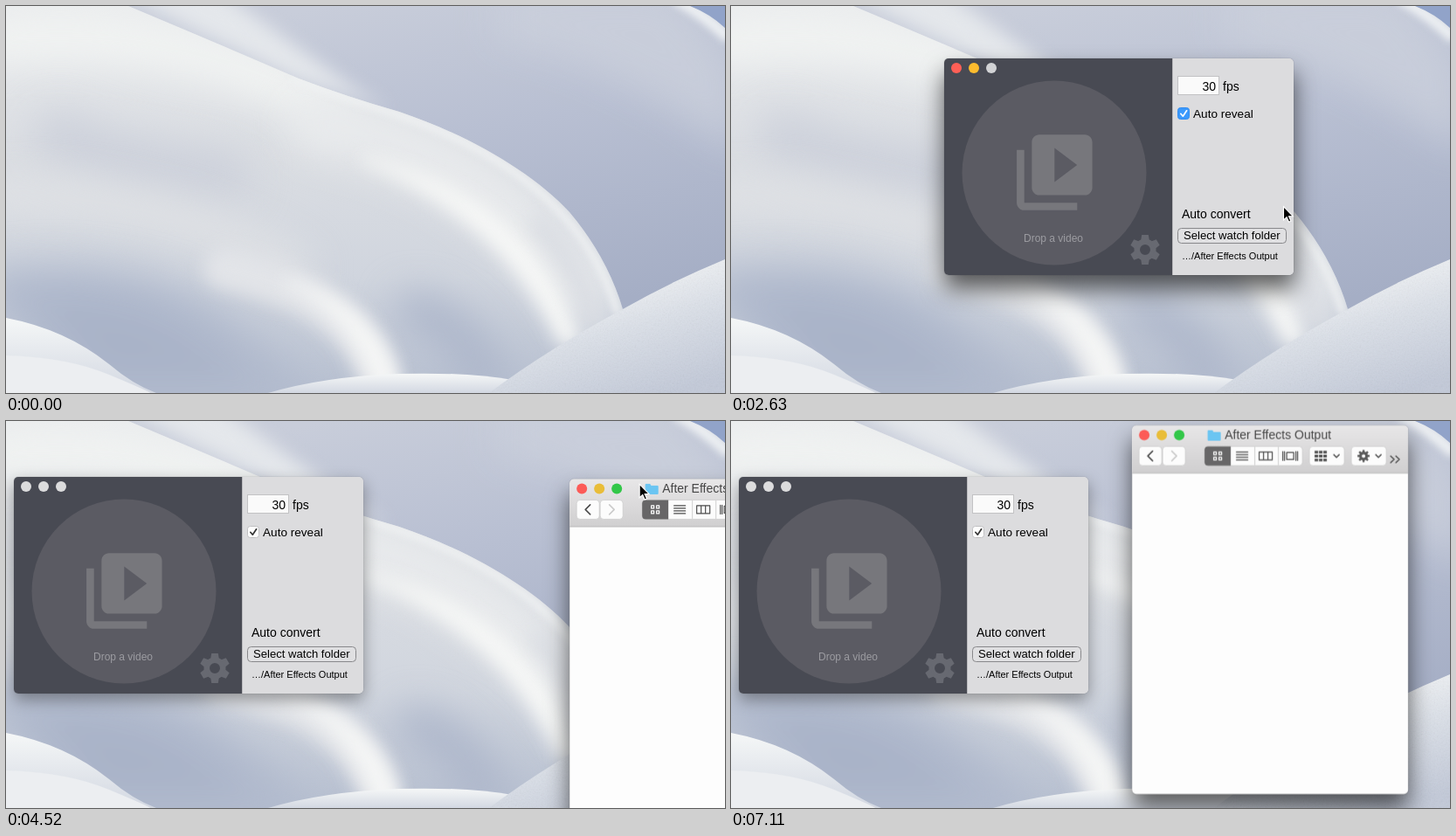
Animation of 823x443 px, one loop 8000 ms. Source, as an HTML page:

```html
<!DOCTYPE html>
<html lang="en">
<head>
<meta charset="utf-8">
<title>Watch folder demo</title>
<style>
html, body { margin: 0; width: 100%; height: 100%; overflow: hidden; }
#stage { position: relative; width: 823px; height: 443px; overflow: hidden; }
#stage > * { position: absolute; left: 0; top: 0; }
svg { display: block; font-family: "Liberation Sans", Arial, sans-serif; }
.window { overflow: hidden; border-radius: 5px; will-change: transform; }
.window svg { position: absolute; left: 0; top: 0; }
#app { width: 400px; height: 248px; transform-origin: 130px 124px; }
#finder { width: 316px; height: 422px; background: #fdfdfd; }
.active { box-shadow: 0 0 1px rgba(0,0,0,.5), 0 16px 27px rgba(0,0,0,.62); }
.inactive { box-shadow: 0 0 1px rgba(0,0,0,.45), 0 7px 18px rgba(0,0,0,.36); }
.soft { filter: blur(4px); }
.softer { filter: blur(10px); }
.softest { filter: blur(22px); }
.line { fill: none; stroke-linecap: round; stroke-linejoin: round; }
</style>
</head>
<body>
<div id="stage">
  <svg id="snow" width="823" height="443">
    <defs>
      <linearGradient id="sky" x1=".45" y1="0" x2=".8" y2="1">
        <stop offset="0" stop-color="#c8cdda"/><stop offset=".35" stop-color="#b8bfd2"/><stop offset=".8" stop-color="#a5aec5"/>
      </linearGradient>
      <linearGradient id="dune" x1=".3" y1="0" x2=".3" y2="1">
        <stop offset="0" stop-color="#e9ebed"/><stop offset=".4" stop-color="#dadde2"/><stop offset=".7" stop-color="#d0d5de"/><stop offset="1" stop-color="#b6bfd0"/>
      </linearGradient>
      <linearGradient id="mound" x1=".35" y1=".25" x2=".75" y2="1">
        <stop offset="0" stop-color="#f2f4f6"/><stop offset=".4" stop-color="#dce1e9"/><stop offset="1" stop-color="#c3cad9"/>
      </linearGradient>
      <linearGradient id="low" x1="0" y1="0" x2="0" y2="1">
        <stop offset="0" stop-color="#f5f7f7"/><stop offset="1" stop-color="#d3d8e2"/>
      </linearGradient>
      <filter id="grain">
        <feTurbulence type="fractalNoise" baseFrequency=".6" numOctaves="2" seed="4"/>
        <feColorMatrix type="saturate" values="0"/>
      </filter>
      <clipPath id="duneClip"><path id="duneShape" d="M0 0H140Q240 42 335 83Q390 104 450 121C530 148 602 190 645 236Q688 287 706 347L640 443H0Z"/></clipPath>
      <clipPath id="moundClip"><path id="moundShape" d="M553 443Q620 393 706 347Q760 316 823 290V443Z"/></clipPath>
    </defs>
    <rect width="823" height="443" fill="url(#sky)"/>
    <path class="softest" d="M560-20H760L840 70V170Q690 60 560 40Z" fill="#cbd0dc" opacity=".8"/>
    <path class="soft" d="M765-9Q795 6 828 37" fill="none" stroke="#eceff2" stroke-width="14"/>
    <path d="M783 0Q806 9 823 25V0Z" fill="#91a3c9"/>
    <path class="softer" d="M120-20H240L400 95L440 118L330 84Z" fill="#e4e7eb"/>
    <use href="#duneShape" fill="url(#dune)"/>
    <g clip-path="url(#duneClip)" class="line">
      <path class="softest" d="M-20 40Q190 15 370 115" stroke="#f1f3f2" stroke-width="56"/>
      <path class="softest" d="M360 135Q550 170 660 330" stroke="#e8eaec" stroke-width="70"/>
      <path class="softest" d="M60 150Q140 185 250 195" stroke="#cdd1db" stroke-width="60"/>
      <path class="softest" d="M-20 215Q180 215 330 300" stroke="#e0e2e5" stroke-width="40"/>
      <path class="softest" d="M-10 320Q150 300 240 370T320 450L100 450Z" fill="#a9b3c8" stroke="#b1bacd" stroke-width="40"/>
      <path class="softest" d="M470 350Q530 370 550 430" stroke="#adb6ca" stroke-width="46"/>
      <path class="softer" d="M250 300Q390 330 425 420" stroke="#e2e4e8" stroke-width="46"/>
      <path class="softer" d="M320 315Q425 340 450 440H425Q400 355 320 315Z" fill="#f6f7f6" stroke="#f3f4f4" stroke-width="7"/>
      <path class="softer" d="M410 175Q600 215 655 385H636Q575 245 410 175Z" fill="#f6f7f6" stroke="#f4f5f4" stroke-width="8"/>
      <path class="softer" d="M610 250Q655 300 674 360" stroke="#d9dce2" stroke-width="20"/>
      <path class="soft" d="M330 84Q390 105 450 125C530 152 596 192 640 242Q682 290 700 350" stroke="#eff1f2" stroke-width="8"/>
    </g>
    <path d="M300 443Q365 424 450 421Q530 419 580 428L640 443Z" fill="url(#low)"/>
    <use href="#moundShape" fill="url(#mound)"/>
    <rect x="550" y="285" width="273" height="158" filter="url(#grain)" clip-path="url(#moundClip)" opacity=".14"/>
    <path d="M0 357Q68 370 118 410Q145 433 172 443H0Z" fill="url(#low)"/>
    <path d="M0 400Q70 402 118 422T165 443H0Z" fill="#eceef1"/>
  </svg>

  <div id="app" class="window">
    <svg width="400" height="248">
      <rect width="262" height="248" fill="#484a53"/>
      <circle cx="126" cy="131" r="105.5" fill="#5b5b63"/>
      <path transform="translate(74.4 78.7) scale(4.325)" fill="#77777c" d="M4 6H2v14c0 1.1.9 2 2 2h14v-2H4zM20 2H8c-1.1 0-2 .9-2 2v12c0 1.1.9 2 2 2h12c1.1 0 2-.9 2-2V4c0-1.1-.9-2-2-2zm-8 12.5v-9l6 4.5z"/>
      <text x="91" y="210" font-size="12" fill="#9c9ca1">Drop a video</text>
      <g id="gear" transform="translate(230 219)" fill="#676971" stroke="#676971"></g>
      <g id="appLights"></g>
      <rect x="261" width="139" height="248" fill="#dcdcde"/>
      <path d="M261.5 0V248" stroke="#b9b9bc"/>
      <rect x="267.5" y="20.5" width="47" height="21" fill="#fafafa" stroke="#c2c2c4"/>
      <g font-size="14">
        <text x="311" y="37" text-anchor="end">30</text>
        <text x="319" y="37">fps</text>
        <text x="285" y="68" font-size="13.6">Auto reveal</text>
        <text x="272" y="183">Auto convert</text>
      </g>
      <rect id="box" x="267.5" y="56.5" width="13" height="13" rx="3"/>
      <path id="tick" class="line" d="M270.8 63.3L273.3 66.2L277.6 59.8" stroke-width="1.7"/>
      <rect x="267.5" y="194.5" width="124" height="17" rx="4" fill="#e0e0e2" stroke="#88888b"/>
      <text x="274" y="207" font-size="13.1">Select watch folder</text>
      <text x="272" y="230" font-size="11">…/After Effects Output</text>
    </svg>
  </div>

  <div id="finder" class="window active">
    <svg width="316" height="422">
      <defs><linearGradient id="bar" x1="0" y1="0" x2="0" y2="1"><stop offset="0" stop-color="#e8e7e8"/><stop offset="1" stop-color="#d0cfd0"/></linearGradient></defs>
      <rect width="316" height="54" fill="url(#bar)"/>
      <path d="M0 54.5H316" stroke="#acabac"/>
      <g id="finderLights"></g>
      <path d="M87 6h5l1 2h8v9h-14z" fill="#6bc5f2" stroke="#6bc5f2" stroke-linejoin="round"/>
      <text x="106" y="16" font-size="14" fill="#454545">After Effects Output</text>
      <g fill="#fcfcfc" stroke="#c5c4c5" stroke-width=".6">
        <rect x="8" y="24" width="26" height="22" rx="4"/>
        <rect x="35" y="24" width="26" height="22" rx="4"/>
        <rect x="83" y="24" width="112" height="22" rx="4"/>
        <rect x="203" y="24" width="40" height="22" rx="4"/>
        <rect x="251" y="24" width="40" height="22" rx="4"/>
      </g>
      <path d="M83 28q0-4 4-4h26v22H87q-4 0-4-4z" fill="#676667"/>
      <path d="M140.5 24.5v21m27-21v21" stroke="#cfcfcf"/>
      <g class="line" stroke="#4d4d4d" stroke-width="1.2">
        <path d="M23.5 29.5L18 35l5.500 5.500" stroke-width="1.6"/>
        <path d="M45.5 29.5L51 35l-5.500 5.500" stroke="#cbcbcb" stroke-width="1.6"/>
        <path d="M93.5 30.5h3v3h-3zm6 0h3v3h-3zm-6 6h3v3h-3zm6 0h3v3h-3z" stroke="#fff"/>
        <path d="M119.5 30.5h13m-13 3h13m-13 3h13m-13 3h13"/>
        <path d="M145.5 30.5h15v9h-15zm5 0v9m5-9v9"/>
        <path d="M177 31h8v8h-8zm-4.500-1v10m2-10v10m13-10v10m2-10v10"/>
        <path d="M209 30.500h14m-14 4.500h14m-14 4.500h14" stroke-width="3" stroke-linecap="butt" stroke-dasharray="4 1"/>
        <path d="M231 33.5l3 3l3-3m42 0l3 3l3-3" stroke-width="1.5"/>
        <path d="M296 35l4 3.800l-4 3.800m6-7.600l4 3.800l-4 3.800" stroke-width="1.4"/>
      </g>
      <g id="action" transform="translate(265 35)" fill="#5b5b5b" stroke="#5b5b5b"></g>
    </svg>
  </div>

  <svg id="cursor" width="16" height="24" style="overflow:visible">
    <path d="M.5.5V16l3.600-3.300l2.400 5.600l2.400-1l-2.400-5.600H11.3Z" stroke="#fff" stroke-width="1.1"/>
  </svg>
</div>
<script>
const LOOP = 8000, SWITCH = 4340;
const $ = id => document.getElementById(id);

function drawGear(node, teeth, body, outer, hole, half) {
  const tooth = `M${-half * 1.3} ${-body * .8}L${-half} ${-outer}H${half}L${half * 1.3} ${-body * .8}Z`;
  const ring = `<circle r="${(body + hole) / 2}" fill="none" stroke-width="${body - hole}"/>`;
  node.innerHTML = ring + Array.from({ length: teeth }, (_, i) =>
    `<path stroke="none" transform="rotate(${i * 360 / teeth})" d="${tooth}"/>`).join("");
}
drawGear($("gear"), 6, 12.5, 17, 6, 3.8);
drawGear($("action"), 8, 5, 7, 2, 1.1);

function drawLights(node, colors) {
  node.innerHTML = colors.map((c, i) => `<circle cx="${14 + 20 * i}" cy="11" r="6" fill="${c}"/>`).join("");
}
drawLights($("finderLights"), ["#fc5b57", "#e9bd38", "#32c748"]);

const linear = k => k;
const smooth = k => k * k * (3 - 2 * k);
const easeIn = k => k ** 1.25;
const easeOut = k => 1 - (1 - k) ** 1.83;

const progress = (t, start, end) => Math.min(1, Math.max(0, (t - start) / (end - start)));
const mix = (a, b, k) => a.map((v, i) => v + (b[i] - v) * k);
const glide = (t, start, end, a, b, ease = smooth) => mix(a, b, ease(progress(t, start, end)));

const appAt = t => glide(t, 3340, 3960, [244, 60], [9, 64], easeIn);

// The window trails the pointer, then settles two pixels lower.
function finderAt(t) {
  const [x, y] = glide(t, SWITCH, 4930, [823, 127], [459, 3], easeOut);
  return [x, y + 2 * progress(t, 5170, 5230)];
}

const gear = [475, 273], titleGrab = [335, 75], panelEdge = [632, 229], rest = [505, 291];
function cursorAt(t) {
  if (t < 880) return glide(t, 409, 670, [500, 460], rest);
  if (t < 1290) return glide(t, 880, 1110, rest, [378, 70]);
  if (t < 2310) return glide(t, 1290, 1780, [378, 70], gear);
  if (t < 2630) return glide(t, 2310, 2630, gear, panelEdge);
  if (t < 3170) return glide(t, 2630, 3110, panelEdge, [520, 182]);
  if (t < 3340) return glide(t, 3170, 3340, [520, 182], titleGrab);
  if (t < SWITCH) return appAt(t).map((v, i) => v + [91, 15][i]);
  if (t < 5170) return glide(t, SWITCH, 4930, [763, 96], [638, 17], linear);
  if (t < 5530) return glide(t, 5170, 5230, [638, 17], [638, 19]);
  if (t < 6870) return glide(t, 5530, 6270, [638, 19], [568, 2]);
  return glide(t, 6870, 7110, [568, 2], [445, 450]);
}

let wasActive;
function setActive(active) {
  if (active === wasActive) return;
  wasActive = active;
  $("app").className = "window " + (active ? "active" : "inactive");
  drawLights($("appLights"), active ? ["#ff5f56", "#fdbc2e", "#d2d3d5"] : Array(3).fill("#dcdcdd"));
  $("box").setAttribute("fill", active ? "#3b99fc" : "#fdfdfd");
  $("box").setAttribute("stroke", active ? "#338df0" : "#c0c0c2");
  $("tick").setAttribute("stroke", active ? "#fff" : "#333");
}

const move = (node, [x, y], extra = "") => node.style.transform = `translate(${x}px,${y}px)${extra}`;

function render(t) {
  const opened = progress(t, 350, 580);
  const app = $("app");
  setActive(t < SWITCH);
  app.style.opacity = t < 410 ? 0 : opened;
  app.style.width = 260 + 140 * progress(t, 1910, 2130) + "px";
  move(app, appAt(t), ` scale(${.92 + .08 * opened})`);
  move($("finder"), finderAt(t));
  $("finder").style.visibility = t < SWITCH ? "hidden" : "visible";
  move($("cursor"), cursorAt(t));
}
// The panel starts one step into its slide, so its width is held until then.
const start = performance.now();
function tick() {
  render((performance.now() - start) % LOOP);
  requestAnimationFrame(tick);
}
tick();
</script>
</body>
</html>
```
